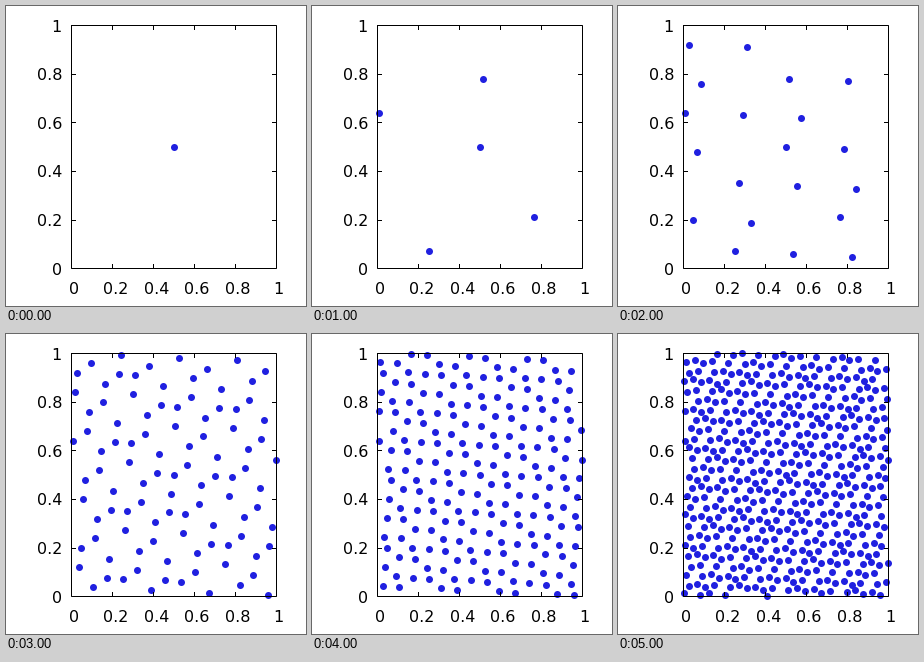
A matplotlib script that plays this animation: 300x300 px, repeating every 6 s.

```python
import matplotlib.pyplot as plt
import numpy as np
from matplotlib.animation import FuncAnimation
from matplotlib.patches import PathPatch
from matplotlib.path import Path

SIZE, DPI = 300, 100
PX = 72 / DPI  # one pixel in points
LEFT, RIGHT, TOP, BOTTOM = 65.55, 270.45, 19.6, 262.6
TICK = 4.5
RADIUS = 3.5
BLUE = "#2020e0"
COUNTS = [1, 5, 20, 100, 200, 500]

plt.rcParams["font.family"] = "DejaVu Sans"


def to_px(x, y):
    return LEFT + x * (RIGHT - LEFT), BOTTOM - y * (BOTTOM - TOP)


def snap(v):
    """Centre of the pixel that holds v."""
    return np.floor(np.asarray(v) + 1e-6) + 0.5


def plastic_points(count):
    """Additive recurrence in the unit square based on the plastic number."""
    g = 1.0
    for _ in range(60):
        g = (1 + g) ** (1 / 3)
    n = np.arange(count)
    return (0.5 + n / g) % 1, (0.5 + n / g**2) % 1


fig = plt.figure(figsize=(SIZE / DPI, SIZE / DPI), dpi=DPI, facecolor="white")
ax = fig.add_axes([0, 0, 1, 1])
ax.set_xlim(0, SIZE)
ax.set_ylim(SIZE, 0)
ax.axis("off")


def line(xs, ys):
    ax.plot(xs, ys, color="black", lw=PX, zorder=3, snap=False,
            solid_capstyle="projecting" if len(xs) > 2 else "butt",
            solid_joinstyle="miter")


def label(pen, base, text):
    # the small shift keeps every glyph on the same pixel grid
    ax.text(np.floor(pen) - 0.4, base, text, fontsize=16 * PX,
            color="black", ha="left", va="baseline")


x0, x1, y0, y1 = snap([LEFT, RIGHT, TOP, BOTTOM])
line([x0, x1, x1, x0, x0], [y0, y0, y1, y1, y0])

for k in range(6):
    x, y = to_px(k / 5, k / 5)
    text = f"{k / 5:g}"
    width = 25 if "." in text else 10
    label(x + 3 - width / 2, 288, text)
    label(56 - width, round(y) + 6, text)
    if 0 < k < 5:
        tx, ty = snap([x, y])
        line([tx, tx], [y1, y1 - TICK])
        line([tx, tx], [y0, y0 + TICK])
        line([x0, x0 + TICK], [ty, ty])
        line([x1, x1 - TICK], [ty, ty])

points = snap(np.column_stack(to_px(*plastic_points(max(COUNTS)))))
discs = [Path.circle(p, RADIUS) for p in points]
dots = ax.add_patch(PathPatch(discs[0], facecolor=BLUE, linewidth=0,
                              zorder=2, snap=False))


def update(i):
    dots.set_path(Path.make_compound_path(*discs[:COUNTS[i]]))
    return (dots,)


anim = FuncAnimation(fig, update, frames=len(COUNTS), interval=1000,
                     init_func=lambda: update(0), repeat=True,
                     repeat_delay=0, blit=False)
plt.show()
```
